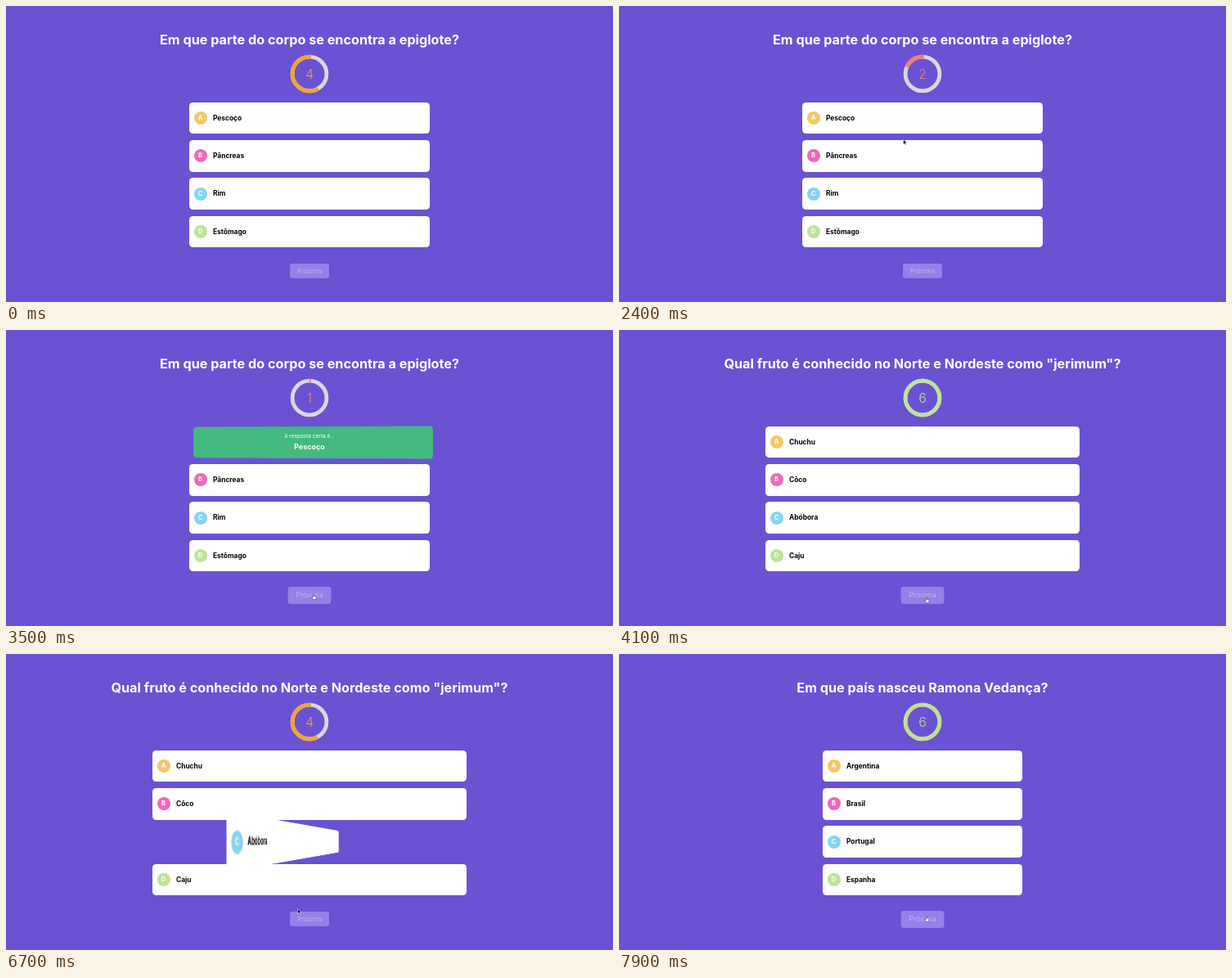
Animation of 742 by 362 pixels, one loop 8000 ms. Source, as an HTML page:

```html
<!DOCTYPE html>
<html lang="pt">
<head>
<meta charset="utf-8">
<style>
  html, body { margin: 0; width: 100%; height: 100%; overflow: hidden; background: #6a52d3; }
  body { position: relative; font-family: Inter, "Open Sans", sans-serif; }
  .page { position: absolute; inset: 0; }
  h1 { position: absolute; left: 0; top: 30.5px; width: 742px; margin: 0; text-align: center;
       font: 700 16.2px/20px Inter, "Open Sans", sans-serif; color: #fff; white-space: nowrap; }
  .card { position: absolute; height: 38.5px; perspective: 385px; }
  .flip { position: absolute; inset: 0; transform-style: preserve-3d; }
  .face { position: absolute; inset: 0; border-radius: 4.5px; backface-visibility: hidden; }
  .front { background: #fff; font: 700 8.4px/38.5px Inter, "Open Sans", sans-serif; color: #000; text-indent: 29px; }
  .badge { position: absolute; left: 5.5px; top: 11.3px; width: 16px; height: 16px; border-radius: 50%;
           font-size: 7.6px; line-height: 16px; text-align: center; text-indent: 0; color: #fff; }
  .back { background: #43b97f; color: #fff; text-align: center; transform: rotateY(180deg);
          font-size: 6.5px; line-height: 12px; }
  .back b { display: block; font-size: 9px; line-height: 14px; }
  .back span { display: block; padding-top: 6px; }
  #button { position: absolute; left: 347px; top: 314.8px; width: 48px; height: 18.6px; border-radius: 3px;
            background: #9580e7; color: #cbc0f4; text-align: center; font-weight: 300; font-size: 8.1px; line-height: 18.6px; }
  svg { position: absolute; left: 0; top: 0; }
  #digit { font-weight: 300; font-size: 16px; text-anchor: middle; }
</style>
</head>
<body>
<div id="pages"></div>
<div id="button">Próxima</div>
<svg width="742" height="362" viewBox="0 0 742 362">
  <g fill="none" stroke-width="4.8">
    <circle cx="371" cy="83" r="20.9" stroke="#d9d9d9"/>
    <circle id="arc" cx="371" cy="83" r="20.9" pathLength="1" transform="rotate(-85 371 83)"/>
  </g>
  <text id="digit" x="371" y="88.8"></text>
  <g id="cursor">
    <path id="arrow" d="M0 0V6.2L1.5 4.9L2.5 7L3.5 6.5L2.6 4.5H4.4Z" fill="#111" stroke="#fff" stroke-width=".5"/>
    <path id="hand" d="M-.6 0Q0 -.8 .6 0V2.6L2.9 3.2Q3.4 3.4 3.2 4.4L2.6 6.6H-.6L-2.5 4Q-2.2 3.2 -.6 4.2Z" fill="#fff" stroke="#222" stroke-width=".5"/>
    <path id="beam" d="M-1.6 -3.6Q0 -3.6 0 -2.6Q0 -3.6 1.6 -3.6M0 -2.6V2.6M-1.6 3.6Q0 3.6 0 2.6Q0 3.6 1.6 3.6" fill="none" stroke="#c9c3e4" stroke-width=".9"/>
  </g>
</svg>
<script>
const LOOP = 8, LIMIT = 6, FLIP = 0.8, HUE_TIME = 1.8;
const $ = id => document.getElementById(id);
const clamp = (v, lo, hi) => Math.min(hi, Math.max(lo, v));
const BADGES = ['#f2c866', '#f266ba', '#85d4f2', '#bce596'];
const HUES = [[188, 229, 150], [247, 184, 1], [237, 130, 122]];

// from: page appears, start: countdown begins, flip: answer turns over (seconds)
const PAGES = [
  { title: 'Em que parte do corpo se encontra a epiglote?', width: 294, from: 0, start: -2.4,
    answers: ['Pescoço', 'Pâncreas', 'Rim', 'Estômago'], right: 0, flip: 2.866 },
  { title: 'Qual fruto é conhecido no Norte e Nordeste como "jerimum"?', width: 384, from: 4, start: 4.26,
    answers: ['Chuchu', 'Côco', 'Abóbora', 'Caju'], right: 2, flip: 6.5 },
  { title: 'Em que país nasceu Ramona Vedança?', width: 244, from: 7.6, start: 7.75,
    answers: ['Argentina', 'Brasil', 'Portugal', 'Espanha'] }
];

// pointer stops: time, x, y
const PATH = [
  [0.6, 440, 215], [1.3, 311, 32], [1.8, 438, 135], [2.1, 440, 195], [2.65, 278, 139], [2.87, 279, 140],
  [3.1, 361, 279], [3.5, 376, 323], [4.1, 376, 327], [4.4, 376, 327], [5.1, 300, 215],
  [5.7, 323.5, 137.5], [6.3, 330, 226], [6.5, 332, 228], [6.7, 356.5, 311.5], [7, 376, 323], [8, 376, 320.5]
];

function add(parent, tag, cls, text = '') {
  const el = parent.appendChild(document.createElement(tag));
  el.className = cls;
  el.textContent = text;
  return el;
}

for (const page of PAGES) {
  page.el = add($('pages'), 'div', 'page');
  add(page.el, 'h1', '', page.title);
  page.answers.forEach((answer, i) => {
    const card = add(page.el, 'div', 'card');
    card.style.cssText = `left:${371 - page.width / 2}px;top:${117.8 + 46.3 * i}px;width:${page.width}px`;
    const flip = add(card, 'div', 'flip');
    const front = add(flip, 'div', 'face front', answer);
    add(front, 'div', 'badge', 'ABCD'[i]).style.background = BADGES[i];
    if (i === page.right) {
      const back = add(flip, 'div', 'face back');
      add(back, 'span', '', 'A resposta certa é...');
      add(back, 'b', '', answer);
      page.turning = flip;
    }
  });
}

// cubic-bezier(.25, .1, .25, 1)
function ease(x) {
  const curve = (a, b, u) => 3 * a * u * (1 - u) ** 2 + 3 * b * u * u * (1 - u) + u ** 3;
  let lo = 0, hi = 1;
  for (let i = 0; i < 24; i++) {
    const mid = (lo + hi) / 2;
    if (curve(.25, .25, mid) < x) lo = mid; else hi = mid;
  }
  return curve(.1, 1, lo);
}

function hue(left) {
  const p = clamp((LIMIT - left) / HUE_TIME, 0, 2), i = Math.min(1, Math.floor(p));
  return `rgb(${HUES[i].map((c, k) => Math.round(c + (HUES[i + 1][k] - c) * (p - i)))})`;
}

function pointerAt(t) {
  const n = PATH.findIndex(p => p[0] > t);
  if (n < 1) return null;
  const a = PATH[n - 1], b = PATH[n];
  let u = (t - a[0]) / (b[0] - a[0]);
  u = u * u * (3 - 2 * u);
  return [a[1] + (b[1] - a[1]) * u, a[2] + (b[2] - a[2]) * u];
}

const show = (el, on) => { el.style.display = on ? '' : 'none'; };

function drawPointer(t) {
  const pos = pointerAt(t);
  show($('cursor'), pos);
  const [x, y] = pos || [0, 0];
  const onButton = x > 347 && x < 395 && y > 315 && y < 333;
  const onTitle = y > 29 && y < 50;
  $('cursor').setAttribute('transform', `translate(${x} ${y})`);
  show($('hand'), onButton);
  show($('beam'), onTitle);
  show($('arrow'), !onButton && !onTitle);
  $('button').style.transform = onButton ? 'scale(1.1)' : 'none';
}

function draw(t) {
  const current = PAGES.filter(p => p.from <= t).pop();
  for (const page of PAGES) show(page.el, page === current);

  if (current.turning) {
    const p = clamp((t - current.flip) / FLIP, 0, 1);
    current.turning.style.transform = p ? `rotateY(${180 * ease(p)}deg)` : 'none';
  }

  const left = clamp(LIMIT - (t - current.start), 0, LIMIT), part = left / LIMIT;
  const color = hue(left);
  $('arc').style.stroke = color;
  $('arc').style.strokeDasharray = `${part} 1`;
  $('arc').style.strokeDashoffset = part - 1;
  $('digit').style.fill = color;
  $('digit').textContent = Math.ceil(left);
  drawPointer(t);
}

function tick() {
  draw(performance.now() / 1000 % LOOP);
  requestAnimationFrame(tick);
}
tick();
</script>
</body>
</html>
```
